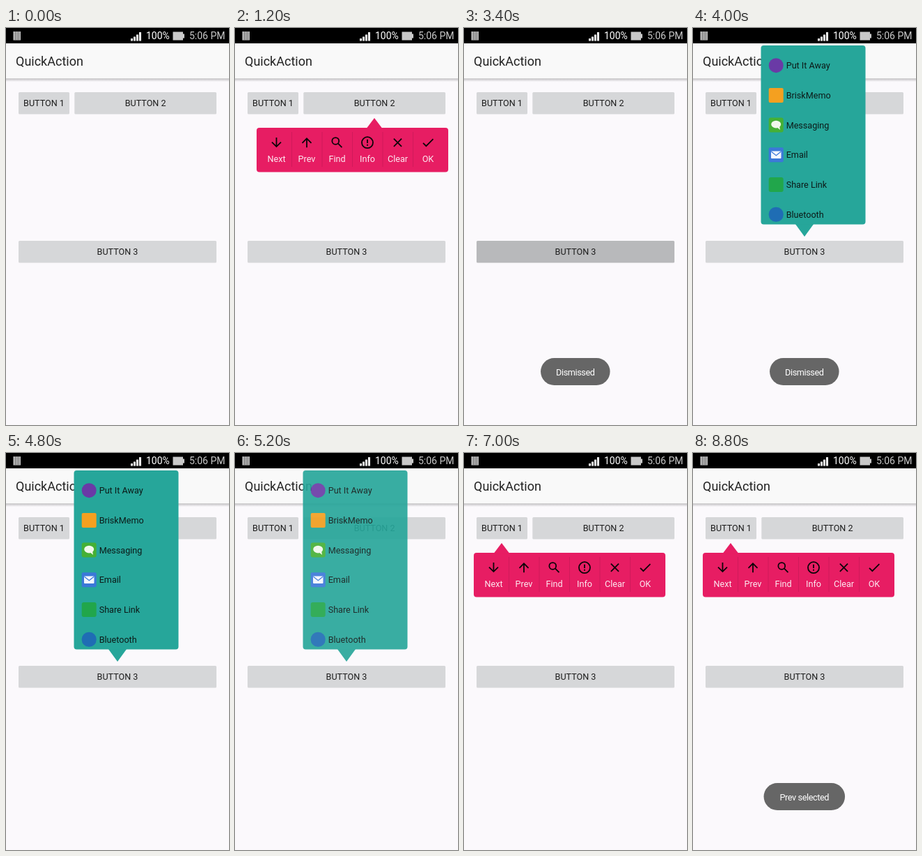
An HTML page that plays this animation: 320 px wide and 569 px high, repeating every 9000 ms.

```html
<!DOCTYPE html>
<html lang="en">
<head>
<meta charset="utf-8">
<title>QuickAction</title>
<style>
html, body { margin: 0; width: 100%; height: 100%; overflow: hidden; background: #fbf9fc; }
svg { display: block; width: 100vw; height: 100vh; }
text { font-family: Roboto, "Noto Sans", sans-serif; font-size: 12.6px; }
.mid { text-anchor: middle; }
.icon { fill: none; stroke: #0b0508; stroke-width: 2; }
.toast { font-size: 12.7px; letter-spacing: -.4px; fill: #fff; text-anchor: middle; }
</style>
</head>
<body>
<svg id="stage" viewBox="0 0 320 569">
  <defs>
    <linearGradient id="shade" x1="0" y1="0" x2="0" y2="1">
      <stop offset="0" stop-color="#999"/>
      <stop offset=".3" stop-color="#cfcdd0"/>
      <stop offset="1" stop-color="#fbf9fc"/>
    </linearGradient>
  </defs>
  <rect width="320" height="569" fill="#fbf9fc"/>
  <rect y="72" width="320" height="5" fill="url(#shade)"/>
  <rect y="22" width="320" height="50.5" fill="#f9f9f9"/>
  <text x="14" y="54" fill="#222" style="font-size:18px">QuickAction</text>
  <rect width="320" height="22" fill="#000"/>
  <rect x="10.5" y="5" width="10.5" height="12.5" fill="#bdbdbd"/>
  <path d="M13.4 5V17M16 5V17M18.6 5V17" stroke="#555" stroke-width=".8"/>
  <path d="M179 15h3v3.500h-3zM183 12.500h3v6h-3zM187 9.500h3v9h-3zM191 6h3v12.500h-3z" fill="#fff"/>
  <text x="201" y="16" fill="#fff" style="font-size:14px">100%</text>
  <path d="M239.500 5.500h14.500v3h2v6h-2v3h-14.500z" fill="#c9c9c9"/>
  <text x="314.500" y="16" fill="#c9c9c9" text-anchor="end" style="font-size:14px">5:06 PM</text>
</svg>
<script>
const LOOP = 9000, STEP = 200;
const stage = document.getElementById('stage');

function add(parent, tag, attrs, label) {
  const el = document.createElementNS('http://www.w3.org/2000/svg', tag);
  for (const key in attrs) el.setAttribute(key, attrs[key]);
  if (label) el.textContent = label;
  parent.appendChild(el);
  return el;
}

function button(x, y, width, label) {
  const face = add(stage, 'rect', { x, y, width, height: 31.5, rx: 1.5 });
  add(stage, 'text', { x: x + width / 2, y: y + 20.3, class: 'mid', fill: '#1d1d1d' }, label);
  return face;
}

function toast(width, label) {
  const g = add(stage, 'g', {});
  add(g, 'rect', { x: 159.8 - width / 2, y: 473, width, height: 39, rx: 19.5, fill: '#666' });
  add(g, 'text', { x: 159.8, y: 497.5, class: 'toast' }, label);
  return g;
}

const actions = [
  ['Next', 'M12 4V18M4.7 11.3L12 18.6 19.3 11.3'],
  ['Prev', 'M12 20V6M4.7 12.7L12 5.4 19.3 12.7'],
  ['Find', 'M4 9.5a5.5 5.5 0 1 0 11 0a5.5 5.5 0 1 0 -11 0M13.7 13.7L19.8 19.8'],
  ['Info', 'M3 12a9 9 0 1 0 18 0a9 9 0 1 0 -18 0M12 7V13M12 15V17'],
  ['Clear', 'M5.7 5.7L18.3 18.3M18.3 5.7L5.7 18.3'],
  ['OK', 'M4.1 12.7L9 17.6 20.3 6.3']
];

// Horizontal menu; its local origin is the top left corner, arrow tip included.
function actionBar(arrow) {
  const g = add(stage, 'g', {});
  add(g, 'rect', { y: 14, width: 275, height: 63.5, rx: 4, fill: '#e71d63' });
  add(g, 'path', { d: `M${arrow - 11} 14.5L${arrow} 0L${arrow + 11} 14.5z`, fill: '#e71d63' });
  actions.forEach(([label, d], i) => {
    const x = 28.5 + 43.5 * i;
    if (i) add(g, 'rect', { x: x - 22, y: 20, width: 1, height: 50, fill: '#d01a5a' });
    add(g, 'path', { d, class: 'icon', transform: `translate(${x - 10.7} 24.5) scale(.89)` });
    add(g, 'text', { x, y: 63, class: 'mid', fill: '#fce9f0' }, label);
  });
  return g;
}

const apps = [
  ['Put It Away', '#6a3aa6', 10.5],
  ['BriskMemo', '#f4a020', 2],
  ['Messaging', '#45b035', 3],
  ['Email', '#3b78d8', 2],
  ['Share Link', '#21a64b', 3],
  ['Bluetooth', '#1f6db4', 10]
];

function appList() {
  const g = add(stage, 'g', {});
  add(g, 'path', { d: 'M146.500 280.500L160 299L173.500 280.500z', fill: '#26a69a' });
  add(g, 'rect', { x: 97.5, y: 25, width: 150, height: 256.5, rx: 4, fill: '#26a69a' });
  apps.forEach(([label, fill, rx], i) => {
    const y = 53.7 + 42.7 * i;
    add(g, 'rect', { x: 108.7, y: y - 10.5, width: 21, height: 21, rx, fill });
    if (label === 'Messaging') {
      add(g, 'ellipse', { cx: 119.2, cy: y - 1, rx: 7, ry: 5.3, fill: '#f1f8ec' });
      add(g, 'path', { d: `M120 ${y + 3}l5 4-1-6z`, fill: '#f1f8ec' });
    }
    if (label === 'Email') {
      add(g, 'rect', { x: 112, y: y - 5.2, width: 14.5, height: 10.5, rx: 1, fill: '#f3f7ff' });
      add(g, 'path', { d: `M112.500 ${y - 4.5}l6.800 5.500 6.800-5.500`, fill: 'none', stroke: fill, 'stroke-width': 1.2 });
    }
    add(g, 'text', { x: 133.7, y: y + 4.6, fill: '#0c1a18' }, label);
  });
  return g;
}

const button1 = button(18, 92, 73, 'BUTTON 1');
const button2 = button(98.3, 92, 203.7, 'BUTTON 2');
const button3 = button(18, 305, 284, 'BUTTON 3');
const wideBar = actionBar(169);
const leftBar = actionBar(40);
const list = appList();
const dismissed = toast(99.5, 'Dismissed');
const selected = toast(116.5, 'Prev selected');

const ramp = (t, start, length) => Math.min(1, Math.max(0, (t - start) / length));
const easeOut = p => 1 - (1 - p) ** 2;
const easeIn = p => p * p;

function fade(el, alpha) {
  el.setAttribute('opacity', alpha);
  el.setAttribute('display', alpha > 0 ? 'inline' : 'none');
}

function press(el, down) {
  el.setAttribute('fill', down ? '#b8b9bb' : '#d6d7d9');
}

// Scale from 30% about a point on the menu's top edge.
function place(bar, x, pivot, size, alpha) {
  const s = 0.3 + 0.7 * size;
  bar.setAttribute('transform', `translate(${x + pivot * (1 - s)} 129) scale(${s})`);
  fade(bar, alpha);
}

function draw(time) {
  const t = Math.floor((time % LOOP) / STEP) * STEP;
  press(button1, t >= 6600 && t < 6800);
  press(button2, t >= 800 && t < 1000);
  press(button3, t >= 3400 && t < 3800);

  const grow = ramp(t, 950, 200), shrink = ramp(t, 2216, 200);
  place(wideBar, 31, 137.5, grow - shrink, easeOut(grow) - easeIn(shrink));

  const open = ramp(t, 6750, 200);
  place(leftBar, 14, 0, open, easeOut(open));

  fade(list, ramp(t, 3680, 200) - easeIn(ramp(t, 5080, 400)));
  fade(dismissed, ramp(t, 2300, 350) - ramp(t, 4350, 350));
  fade(selected, ramp(t, 8300, 300));
}

const begin = performance.now();
function tick(now) {
  draw(Math.max(0, now - begin));
  requestAnimationFrame(tick);
}
draw(0);
requestAnimationFrame(tick);
</script>
</body>
</html>
```
